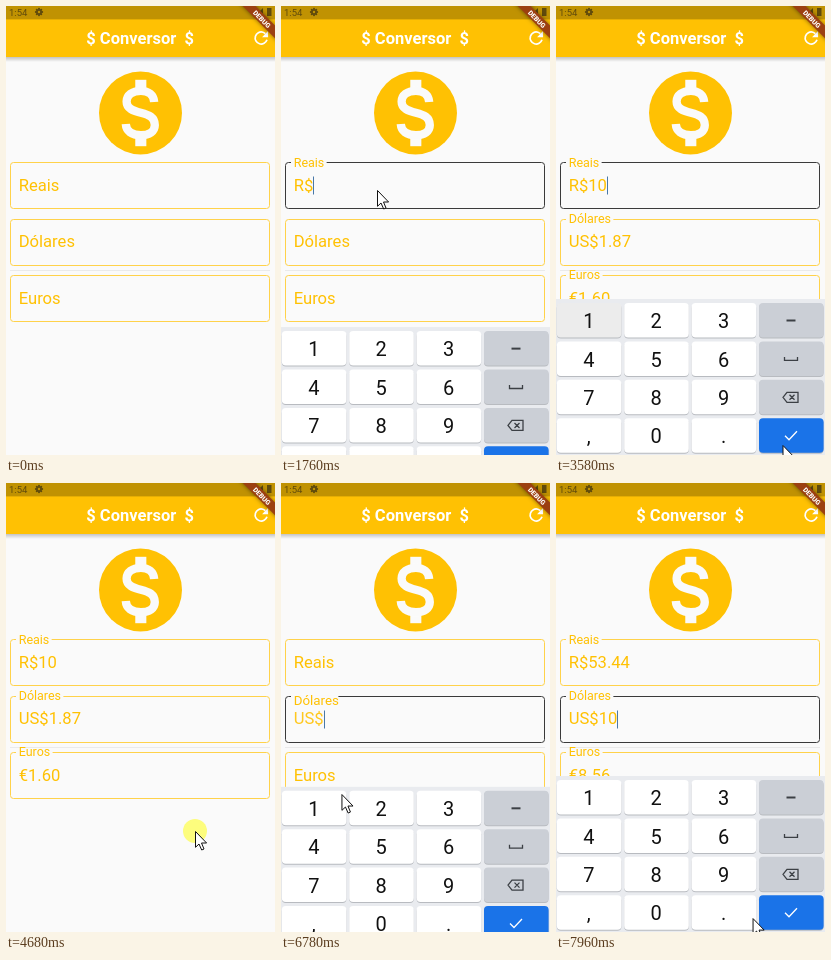
Recreate the animation shown at these times as an HTML page with a canvas. Size 269 by 449 pixels, loop 8 s.

```html
<!DOCTYPE html>
<html lang="pt">
<head>
<meta charset="utf-8">
<title>Conversor</title>
<style>
html, body { margin: 0; width: 100%; height: 100%; overflow: hidden; background: #fafafa; }
canvas { display: block; width: 269px; height: 449px; }
</style>
</head>
<body>
<canvas id="stage"></canvas>
<script>
const W = 269, H = 449, LOOP = 8000;
const AMBER = '#ffc103', PAPER = '#fafafa', INK = '#5f4a0c', STATUS = '#c09202';
const canvas = document.getElementById('stage');
const c = canvas.getContext('2d');
const dpr = window.devicePixelRatio || 1;
canvas.width = W * dpr;
canvas.height = H * dpr;

// Rates in reais per unit
const FIELDS = [
  { label: 'Reais', prefix: 'R$', rate: 1 },
  { label: 'Dólares', prefix: 'US$', rate: 5.344 },
  { label: 'Euros', prefix: '€', rate: 6.243 }
];
// In each session the user types "10" into one field
const SESSIONS = [
  { field: 0, open: 1600, focus: 1590, types: [2520, 3160], release: 4300, done: 3960, clear: 5660 },
  { field: 1, open: 6563, focus: 6650, types: [7270, 7690], release: 7400, done: LOOP, clear: LOOP }
];
const KEYS = ['123-', '456_', '789<', ',0.!'];
const keyOne = [34, 329], keyZero = [104, 423], keyDone = [226.5, 439];
// Pointer stops: arrival, departure, place
const STOPS = [
  [0, 390, 214, 331],
  [1150, 1770, 96, 184],
  [2380, 2590, ...keyOne],
  [2940, 3220, ...keyZero],
  [3570, 3980, ...keyDone],
  [4520, 4720, 189, 348],
  [5390, 5590, 253, 33],
  [5950, 6500, 168, 238],
  [6893, 7350, ...keyOne],
  [7600, 7740, ...keyZero],
  [8066, 8200, ...keyDone]
];
const REFRESH_TAP = 5430;

const clamp = x => Math.min(1, Math.max(0, x));
const smooth = x => { x = clamp(x); return x * x * (3 - 2 * x); };
const easeOut = x => 1 - (1 - clamp(x)) ** 3;

function text(s, x, mid, size, color, weight = 400, align = 'left') {
  c.font = `${weight} ${size}px Roboto, sans-serif`;
  c.textAlign = align;
  c.fillStyle = color;
  c.fillText(s, x, mid + size * 0.355);
  return c.measureText(s).width;
}
function rect(x, y, w, h, color) {
  c.fillStyle = color;
  c.fillRect(x, y, w, h);
}
function round(x, y, w, h, r, color) {
  c.beginPath();
  c.roundRect(x, y, w, h, r);
  if (color) {
    c.fillStyle = color;
    c.fill();
  }
}
function disc(x, y, r, color) {
  c.beginPath();
  c.arc(x, y, r, 0, 7);
  c.fillStyle = color;
  c.fill();
}
function stroke(d, color, width) {
  c.strokeStyle = color;
  c.lineWidth = width;
  c.stroke(new Path2D(d));
}
function placed(x, y, scale, paint) {
  c.save();
  c.translate(x, y);
  c.scale(scale, scale);
  paint();
  c.restore();
}

function drawCoin() {
  disc(134.5, 107, 41.5, AMBER);
  placed(134.5, 107, 4.15, () => {
    rect(-1.26, -8, 2.67, 2.4, PAPER);
    rect(-1.26, 5.6, 2.67, 2.4, PAPER);
    stroke('M3.3-2.66C3.2-4.4 1.9-5.35 .1-5.35C-2-5.35-3.35-4.3-3.35-2.8C-3.35-1.1-1.8-.55 .08-.07S3.45 1 3.45 2.9C3.45 4.5 2.1 5.35 .1 5.35C-2.1 5.35-3.45 4.4-3.55 2.67', PAPER, 2);
  });
}

function drawBanner() {
  c.save();
  c.translate(W, 0);
  c.rotate(Math.PI / 4);
  c.shadowColor = 'rgba(0,0,0,.5)';
  c.shadowBlur = 4 * dpr;
  rect(-30, 13.8, 60, 9, '#9c4010');
  c.shadowBlur = 0;
  text('DEBUG', 0, 18.7, 6.8, '#fff', 900, 'center');
  c.restore();
}

function drawBar(t) {
  const shade = c.createLinearGradient(0, 51, 0, 56);
  shade.addColorStop(0, 'rgba(0,0,0,.22)');
  shade.addColorStop(1, 'rgba(0,0,0,0)');
  rect(0, 51, W, 5, shade);
  rect(0, 0, W, 51, AMBER);
  rect(0, 0, W, 13.4, STATUS);
  text('1:54', 3, 6.3, 9.5, INK);
  for (let a = 0; a < 6; a += Math.PI / 4) disc(33 + 3.2 * Math.cos(a), 6 + 3.2 * Math.sin(a), 1, INK);
  disc(33, 6, 3, INK);
  disc(33, 6, 1.2, STATUS);
  c.fillStyle = INK;
  c.fill(new Path2D('M249 10L257 2V10Z'));
  rect(261, 2, 4.5, 8, INK);
  text('$ Conversor\u00a0 $', 134.1, 32, 16.5, '#fff', 700, 'center');

  const ripple = 0.11 * smooth((t - REFRESH_TAP) / 150) * (1 - smooth((t - REFRESH_TAP - 220) / 280));
  if (ripple) disc(255, 32, 22, `rgba(200,200,200,${ripple})`);
  placed(255.2, 32, 0.86, () => {
    c.beginPath();
    c.arc(0, 0, 7, 0.29, -0.81);
    c.lineWidth = 2;
    c.strokeStyle = c.fillStyle = '#fff';
    c.stroke();
    c.fill(new Path2D('M1-1H8V-8Z'));
  });
  drawBanner();
}

function amount(s, i, t) {
  const digits = s.types.filter(at => at <= t).length;
  if (!digits || t >= s.clear) return '';
  const typed = '10'.slice(0, digits);
  return i === s.field ? typed : (typed * FIELDS[s.field].rate / FIELDS[i].rate).toFixed(2);
}

function drawField(i, s, t) {
  const { label, prefix } = FIELDS[i];
  const y = 157 + 56.3 * i, edge = Math.ceil(y) - 0.5;
  const own = i === s.field, focused = own && t >= s.focus && t < s.done;
  const raise = own ? s.focus + 13 * i : s.types[0];
  const lift = smooth((t - raise) / 167) * (1 - smooth((t - s.clear - 80) / 167));
  c.lineWidth = 1;
  c.strokeStyle = focused ? '#3a3a3a' : '#ffd24a';
  round(4.5, edge, 259, 46, 3);
  c.stroke();
  c.font = '400 12.5px Roboto, sans-serif';
  rect(10, edge - 1, (c.measureText(label).width + 5) * clamp(lift * 2), 2, PAPER);
  text(label, 12.7, y - 0.6 + 22.8 * (1 - lift), 16.6 - 4.1 * lift, AMBER);
  if (!lift) return;
  c.globalAlpha = Math.sqrt(lift);
  const end = 12.7 + text(prefix + amount(s, i, t), 12.7, y + 22.15, 16.6, AMBER);
  c.globalAlpha = 1;
  if (focused) rect(Math.round(end), edge + 14, 1, 18, '#4878a8');
}

function drawKey(ch, x, y, pressed) {
  const side = x > 200, done = ch === '!';
  round(x, y + 1, 64.6, 34.5, 4, '#b8bbc0');
  round(x, y, 64.6, 34.5, 4, done ? '#1a73e8' : side ? '#cbcfd6' : pressed ? '#ececec' : '#fff');
  if (!side) {
    text(ch, x + 32, y + 18, 20, '#111', 400, 'center');
    return;
  }
  const shape = {
    '-': 'M-4.5 0H4.5',
    '_': 'M-6.5-2V1.5H6.5V-2',
    '<': 'M-8 0L-4-5H7V5H-4ZM-1.5-2.5L3.5 2.5M3.5-2.5L-1.5 2.5',
    '!': 'M-6 0L-2 4L6-4.5'
  }[ch];
  placed(x + 32, y + 17.5, 1, () => stroke(shape, done ? '#fff' : '#3c4045', ch === '-' ? 2 : 1.3));
}

function drawKeyboard(s, t) {
  const shown = easeOut((t - s.open) / 370) * (1 - smooth((t - s.done) / 230));
  if (!shown) return;
  const top = 293 + 156 * (1 - shown);
  rect(0, top, W, 156, '#e9ebef');
  const held = t >= s.types[0] - 70 && t < s.release;
  KEYS.forEach((row, r) => [...row].forEach((ch, i) =>
    drawKey(ch, 0.8 + i * 67.4, top + 4 + r * 38.4, ch === '1' && held)));
}

function drawPointer(t) {
  const [, leave, x0, y0] = STOPS.filter(stop => stop[0] <= t).pop();
  if (t < STOPS[0][1]) return;
  const [arrive, , x1, y1] = STOPS.find(stop => stop[0] > t);
  const k = smooth((t - leave) / (arrive - leave));
  // A press lights up shortly after each arrival
  const since = t - STOPS.filter(stop => stop[0] <= t).pop()[0];
  placed(x0 + (x1 - x0) * k, y0 + (y1 - y0) * k, 1, () => {
    if (since >= 70 && since < 200) disc(0, 0, 12, 'rgba(255,255,0,.5)');
    const arrow = 'M.5 .5V16.3L4 13 6.7 19 9 18 6.5 12H11.6Z';
    c.fillStyle = '#fff';
    c.fill(new Path2D(arrow));
    stroke(arrow, '#111', 1);
  });
}

function draw(t) {
  const s = SESSIONS[t < 6500 ? 0 : 1];
  c.setTransform(dpr, 0, 0, dpr, 0, 0);
  rect(0, 0, W, H, PAPER);
  drawBar(t);
  drawCoin();
  rect(4, 264, 260, 0.8, '#e6e6e6');
  FIELDS.forEach((_, i) => drawField(i, s, t));
  drawKeyboard(s, t);
  drawPointer(t);
}

const start = performance.now();
function frame() {
  draw((performance.now() - start) % LOOP);
  requestAnimationFrame(frame);
}
frame();
</script>
</body>
</html>
```
